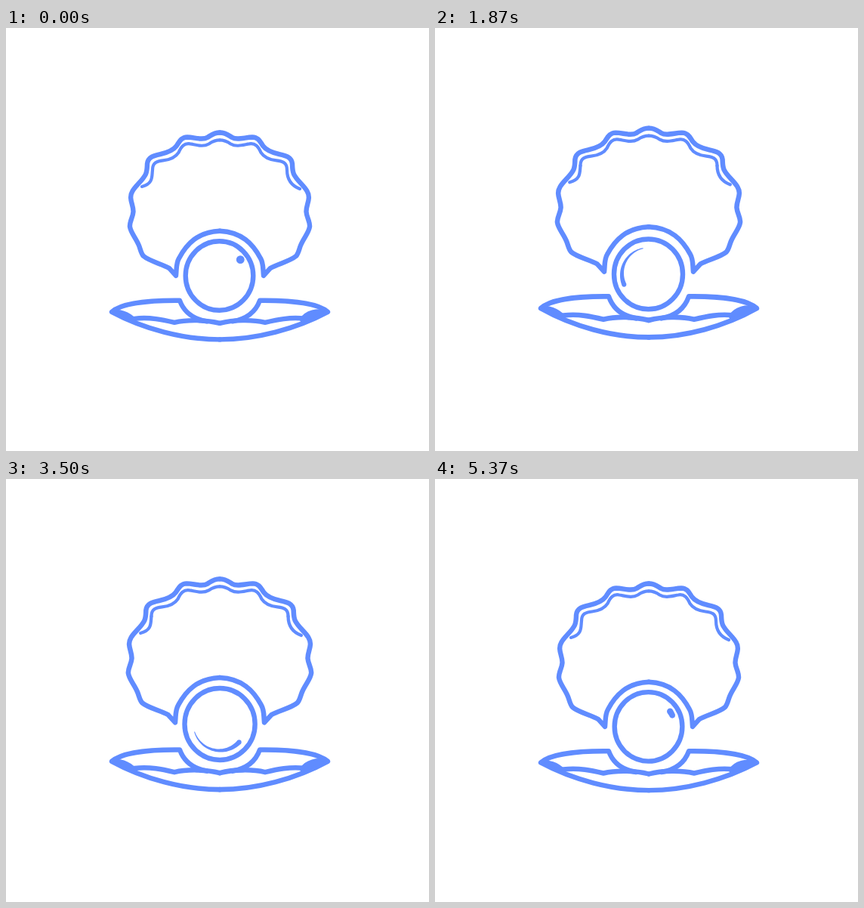
Write an HTML page that moves like this. It is 560 px wide and 560 px high and loops after 5500 ms.

```html
<!DOCTYPE html>
<html lang="en">
<head>
<meta charset="utf-8">
<title>Pearl in a shell</title>
<style>
  html, body { margin: 0; width: 100%; height: 100%; overflow: hidden; background: #fff; }
  svg { display: block; width: 560px; height: 560px; }
  .line { fill: none; stroke: #608cff; stroke-width: 6.4; stroke-linecap: round; stroke-linejoin: round; }
  .thin { stroke-width: 4.2; }
  .solid { fill: #608cff; }
</style>
</head>
<body>
<svg viewBox="0 0 560 560">
  <g id="lid" class="line">
    <g id="lidHalf">
      <path d="M283 138.500C275 138.500 271.500 142 267 144.800C260 149 250 144.800 240 144.500C231 145 229.500 151 225.500 156.500C221 162.500 213.500 165 205 167C196 169 188 170.500 187 180C186.800 184 187 189 185 193.500C181 202 172 208 167.500 216C161.500 226 169 234 168.500 243.500C168 251 163.500 256 164 263C165 271 172 278 176 288C178 293 179 299 182 302C190 309 207 312.500 216 318L225 328C226 318 225 312 229 305C239 286 254 270 283 268.800"/>
      <path class="thin" d="M194 188C194 178 200 176.500 208 175.500C217 174.500 224 172 228.500 165C232 157 236 152 244 153.500C252 154.800 261 158 268.500 153.500C273 150.500 277 148.500 283 148.500"/>
    </g>
    <use href="#lidHalf" transform="matrix(-1 0 0 1 566 0)"/>
    <path class="thin" d="M180 210C195 206 193 197 194 188M389 213C376 208 372 199 372 188"/>
  </g>
  <g id="base" class="line">
    <g id="baseHalf">
      <path d="M283 412.500C235 412.500 182 398.500 140 376C152 365.500 185 360.500 230 361C236 377.500 248 385.500 266 388.500"/>
      <path d="M170 385C190 382.500 208 386.500 223 390C240 386 265 386.500 283 391"/>
    </g>
    <use href="#baseHalf" transform="matrix(-1 0 0 1 566 0)"/>
    <path class="solid" stroke-width="3" d="M141 375.500C149 372.500 163 377 171 386L171 389Z"/>
    <path class="solid" stroke-width="3" d="M425 375.500C412 371.500 397 375 390 386L392 389Z"/>
  </g>
  <ellipse id="pearl" class="line"/>
  <path id="shine" class="solid"/>
</svg>
<script>
const LOOP = 5500, FPS = 8, CYCLE = 22, SPIN = 11;
const $ = id => document.getElementById(id);
const lid = $('lid'), base = $('base'), pearl = $('pearl'), shine = $('shine');
const clamp = x => Math.min(1, Math.max(0, x));
const mix = (a, b, k) => a + (b - a) * k;
const wave = turns => (1 - Math.cos(2 * Math.PI * turns)) / 2;
const ease = x => wave(clamp(x) / 2);

// Eased value through keys spaced one spin apart
function track(keys, n) {
  const i = Math.floor(n / SPIN);
  return mix(keys[i], keys[i + 1], ease(n / SPIN - i));
}

function scaleAbout(el, x, y, sx, sy, dy) {
  el.setAttribute('transform', `translate(${x} ${y + dy}) scale(${sx} ${sy}) translate(${-x} ${-y})`);
}

function dot(x, y, r) {
  return `M${x - r} ${y}a${r} ${r} 0 1 1 ${2 * r} 0a${r} ${r} 0 1 1 ${-2 * r} 0Z`;
}

// Tapered stroke running along a circle, thick at the head
function taper(cx, cy, radius, tail, head, thin, thick) {
  const at = (deg, r) => {
    const a = deg * Math.PI / 180;
    return [cx + r * Math.cos(a), cy + r * Math.sin(a)];
  };
  const outer = [], inner = [], steps = 32;
  for (let i = 0; i <= steps; i++) {
    const k = i / steps, deg = mix(tail, head, k), w = mix(thin, thick, k);
    outer.push(at(deg, radius + w));
    inner.unshift(at(deg, radius - w));
  }
  // Reversed so that it winds the same way as the end dots
  const body = 'M' + outer.concat(inner).reverse().join('L') + 'Z';
  return body + dot(...at(tail, radius), thin) + dot(...at(head, radius), thick);
}

function draw(n) {
  const open = wave((n + 0.6) / CYCLE), lift = wave((n - 1.3) / CYCLE);
  scaleAbout(lid, 283, 138.5, 1 + 0.027 * open, 1 + 0.004 * open, -9.4 * open);
  scaleAbout(base, 283, 361, 1, 1 + 0.06 * lift, -6.6 * lift);

  const cx = track([282.5, 282.5, 282.5, 283.5, 282.5], n);
  const cy = track([328, 324, 330.5, 320, 328], n);
  const r = track([45.3, 45.8, 46.5, 47.5, 45.3], n);
  const box = { cx, cy, rx: r - 0.5, ry: r + 0.4 };
  for (const key in box) pearl.setAttribute(key, box[key]);

  const p = n % SPIN;
  const length = 122 * wave(p / SPIN);
  const head = -35 - 360 * ease((p + 0.5) / 9.4);
  const thick = 3.1 + 2.3 * clamp(1 - length / 18);
  const thin = mix(thick, 0.5, clamp(length / 100));
  shine.setAttribute('d', taper(cx, cy, 35, head + length, head, thin, thick));
}

const start = performance.now();
function tick(now) {
  const t = Math.max(0, now - start) % LOOP;
  draw(Math.floor((t + 5) * FPS / 1000) % (LOOP * FPS / 1000));
  requestAnimationFrame(tick);
}
draw(0);
requestAnimationFrame(tick);
</script>
</body>
</html>
```
